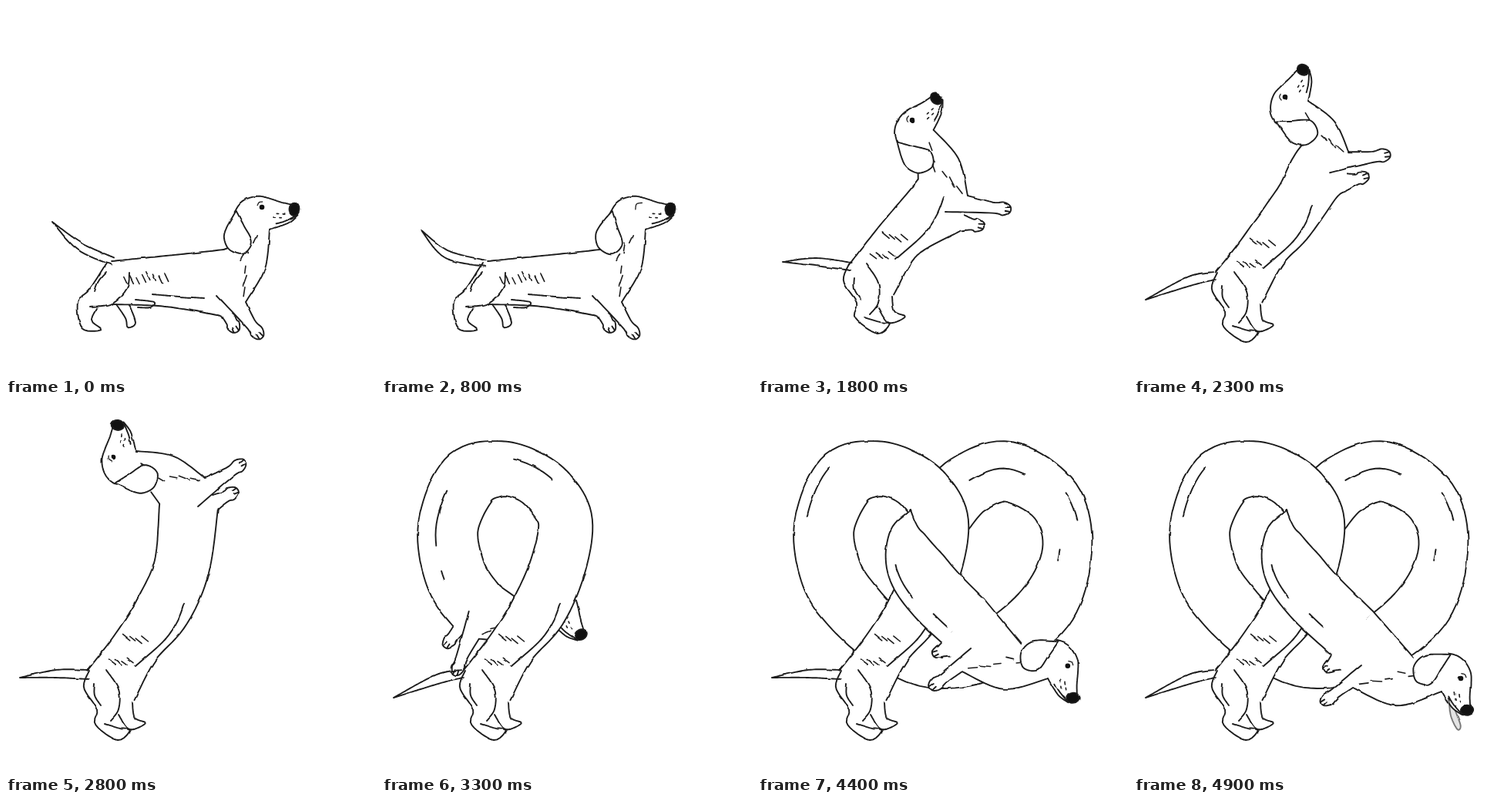
An HTML page that plays this animation: 480 px wide and 480 px high, repeating every 5 s.

```html
<!DOCTYPE html>
<html lang="en">
<head>
<meta charset="utf-8">
<title>Dachshund pretzel</title>
<style>
html, body { margin: 0; width: 100%; height: 100%; overflow: hidden; background: #fff; }
svg { display: block; width: 100vw; height: 100vh; }
</style>
</head>
<body>
<svg viewBox="0 0 480 480">
  <filter id="pencil" filterUnits="userSpaceOnUse" x="0" y="0" width="480" height="480" color-interpolation-filters="sRGB">
    <feTurbulence type="fractalNoise" baseFrequency=".07" numOctaves="1" seed="4"/>
    <feDisplacementMap in="SourceGraphic" scale="3" xChannelSelector="R" yChannelSelector="G"/>
  </filter>
  <g id="dog" filter="url(#pencil)" fill="none" stroke="#1c1c1c" stroke-width="1.9" stroke-linecap="round" stroke-linejoin="round"></g>
</svg>
<script>
const SUB = 10, COUNT = 40, RAD = Math.PI / 180;
const parse = s => s.split(' ').map(p => p.split(',').map(Number));
const rev = a => [...a].reverse();
const lerp = (a, b, k) => a + (b - a) * k;
const lerpPt = (p, q, k) => p.map((v, i) => lerp(v, q[i], k));
const spin = ([x, y], r) => [x * Math.cos(r) - y * Math.sin(r), x * Math.sin(r) + y * Math.cos(r)];
const add = (p, x, y) => [p[0] + x, p[1] + y, ...p.slice(2)];

function random(seed) {
  return () => (seed = (seed * 16807) % 2147483647) / 2147483647;
}

// Catmull-Rom curve; a third value (half width) is carried along
function smooth(pts) {
  const out = [], at = i => pts[Math.max(0, Math.min(pts.length - 1, i))];
  for (let i = 0; i < pts.length - 1; i++) {
    const [a, b, c, d] = [at(i - 1), at(i), at(i + 1), at(i + 2)];
    for (let j = 0; j < SUB; j++) {
      const t = j / SUB;
      out.push(b.map((_, k) => .5 * (2 * b[k] + (c[k] - a[k]) * t
        + (2 * a[k] - 5 * b[k] + 4 * c[k] - d[k]) * t * t
        + (3 * b[k] - a[k] - 3 * c[k] + d[k]) * t * t * t)));
    }
  }
  return [...out, at(pts.length)];
}

// evenly spaced points, so that any two curves can be blended
function even(pts) {
  const len = [0];
  for (let i = 1; i < pts.length; i++)
    len.push(len[i - 1] + Math.hypot(pts[i][0] - pts[i - 1][0], pts[i][1] - pts[i - 1][1]));
  const total = len[len.length - 1], out = [];
  for (let n = 0, i = 1; n < COUNT; n++) {
    const d = total * n / (COUNT - 1);
    while (i < pts.length - 1 && len[i] < d) i++;
    out.push(lerpPt(pts[i - 1], pts[i], (d - len[i - 1]) / (len[i] - len[i - 1] || 1)));
  }
  return out;
}
const curve = s => even(smooth(parse(s)));
const curves = raw => Object.fromEntries(Object.entries(raw).map(([k, s]) => [k, curve(s)]));

// a line beside a spine; side -1 is the back, 1 the belly
const beside = (spine, side) => spine.map(([x, y, half], i) => {
  const a = spine[Math.max(0, i - 1)], b = spine[Math.min(spine.length - 1, i + 1)];
  const dx = b[0] - a[0], dy = b[1] - a[1], k = half * side / (Math.hypot(dx, dy) || 1);
  return [x - dy * k, y + dx * k];
});
const edges = spine => [beside(spine, -1), beside(spine, 1)];

// spines: x, y, half width
const LEGUP = '136,365,36 168,315,31 203,268,36 228,211,36';
const RING = smooth(parse(LEGUP + ' 238,153,35 219,116,35 190,93,34 152,84,36 112,99,41 86,158,39 94,217,40 119,258,40 165,302,38 225,331,37 298,321,36 372,265,38 401,190,32 385,125,35 325,88,39 272,105,40 240,140,40'));
const STRAND = smooth(parse('198,138,0 192,168,22 203,208,37 232,248,40 283,297,39'));
const [RING_EDGES, STRAND_EDGES] = [RING, STRAND].map(edges);

const TAIL = curves({
  raised: '138,331,5 96,312,5 60,280,0',
  dropped: '134,334,4 84,322,5 51,291,0',
  back: '121,338,5 75,332,5 32,332,0',
  level: '107,351,6 65,350,5 18,355,0',
  low: '104,350,5 72,357,6 15,381,0'
});
const STANDING = curves({
  thigh: '130,334 108,368 93,384 99,418 124,420 111,408 118,392',
  haunch: '160,347 157,366 138,386 109,390',
  inner: '130,345 120,357 115,370',
  far: '143,387 155,405 158,417 168,411 160,388',
  fold: '190,374 225,377 258,379',
  bump: '168,381 191,384 187,391 172,391'
});
const UPRIGHT = curves({
  thigh: '108,346 101,368 118,396 116,416 145,436 161,423 148,421 128,415',
  haunch: '130,345 146,370 146,396 135,411',
  inner: '115,363 115,378 123,391',
  far: '146,403 160,422 181,414 167,407 164,388',
  fold: '168,340 205,307 222,282 231,259'
});
const warp = (o, fn) => Object.fromEntries(Object.entries(o).map(([k, v]) => [k, v.map(fn)]));

// points: eye, shoulder, chest, near paw, far paw
const front = (pts, look, swing, bulge) => ({ pts: parse(pts), look, swing, bulge });
const STAND = {
  spine: curve('138,359,28 208,357,33 281,359,43'), tail: TAIL.raised, hind: STANDING,
  front: front('332,261 274,376 311,384 331,430 299,422', 4, 0, .1)
};
const RISE = {
  spine: curve('147,355,35 184,302,31 236,258,43'), tail: TAIL.back, hind: warp(UPRIGHT, p => add(p, 10, -11)),
  front: front('200,148 243,267 272,246 327,264 292,286', -42, 0, .12)
};
const TALL = {
  spine: curve(LEGUP + ' 237,133,38'), tail: TAIL.level, hind: UPRIGHT,
  front: front('139,69 249,133 258,96 309,75 300,112', -82, -.15, .12)
};
const THREAD = front('313,275 201,233 188,264 147,287 149,243', 88, -.25, .1);
const END = front('424,356 295,338 284,368 244,389 247,345', 79, -.25, .18);

// head seen from the eye: x runs to the nose, y to the jaw
const HEAD = {
  crown: '-35,9 -29,-2 -19,-10 -5,-14 9,-12 25,-8 38,-6',
  muzzle: '47,7 37,17 25,23 12,28',
  mouth: '45,8 31,16 20,20',
  ear: '-33,7 -44,30 -46,44 -38,58 -20,62 -10,46 -22,25 -33,7',
  tongue: '22,20 45,22 64,17 60,12 40,15'
};
const EAR_ROOT = [-33, 7], NAPE = [-38, 55];

const mixCurve = (a, b, h, f = h) => a.map((p, i) => lerpPt(p, b[i], lerp(h, f, i / (COUNT - 1))));
const mixFront = (a, b, k) => ({
  pts: mixCurve(a.pts, b.pts, k),
  look: lerp(a.look, b.look, k), swing: lerp(a.swing, b.swing, k), bulge: lerp(a.bulge, b.bulge, k)
});
// h blends the hind end, f the front end
const mix = (a, b, h, f = h) => ({
  spine: mixCurve(a.spine, b.spine, h, f),
  tail: mixCurve(a.tail, b.tail, h),
  hind: Object.fromEntries(Object.keys(b.hind).map(k => [k, mixCurve(a.hind[k], b.hind[k], h)])),
  front: mixFront(a.front, b.front, f)
});

let ink = '';
const path = pts => 'M' + pts.map(p => p[0].toFixed(1) + ' ' + p[1].toFixed(1)).join('L');
const line = (pts, attr = '') => { ink += `<path d="${path(pts)}" ${attr}/>`; };
const cover = pts => line(pts, 'fill="#fff" stroke="none"');
const solid = pts => line(pts, 'fill="#fff"');

function dash(p, angle, length) {
  const [x, y] = spin([length / 2, 0], angle);
  line([add(p, -x, -y), add(p, x, y)], 'stroke-width="1.6"');
}

function drawLimb(inner, outer, paw) {
  const base = lerpPt(inner, outer, .5);
  const dx = paw[0] - base[0], dy = paw[1] - base[1], len = Math.hypot(dx, dy);
  const side = Math.sign((outer[1] - base[1]) * dx - (outer[0] - base[0]) * dy);
  const at = (back, w) => add(paw, ...spin([-back, w * side], Math.atan2(dy, dx)));
  const wrist = Math.min(22, len / 2);
  solid(smooth([inner, at(wrist, -7), at(9, -8.5), at(0, -4), at(0, 4), at(9, 8.5), at(wrist, 7), outer]));
  [-3, 3].forEach(w => line([at(0, w), at(6, w * .8)]));
}

function drawFront({ pts: [eye, shoulder, chest, paw, farPaw], look, swing, bulge }, back, belly, { closed, pant } = {}) {
  const turn = look * RAD;
  const place = p => add(eye, ...spin(p, turn));
  const part = (k, fn = p => p) => smooth(parse(HEAD[k]).map(p => place(fn(p))));
  const [crown, muzzle] = ['crown', 'muzzle'].map(k => part(k));
  const chin = muzzle[muzzle.length - 1], nape = place(NAPE);
  const dx = chin[0] - chest[0], dy = chin[1] - chest[1], run = Math.atan2(dy, dx);
  const throat = smooth([chest, add(lerpPt(chest, chin, .5), -dy * bulge, dx * bulge), chin]);

  drawLimb(belly, lerpPt(belly, chest, .45), farPaw);
  cover([...throat, ...rev(muzzle), ...rev(crown), nape, back, belly]);
  if (pant) line(part('tongue', ([x, y]) => [22 + (x - 22) * pant, y]), 'stroke="#777" fill="#e4e4e4"');
  [throat, muzzle, crown, part('mouth'), [back, nape]].forEach(s => line(s));
  drawLimb(shoulder, chest, paw);

  const rnd = random(31);
  for (let i = 0; i < 6; i++) {
    const inward = spin([0, -6 - 17 * rnd()], run);
    dash(add(lerpPt(chest, chin, .12 + .14 * i), ...inward), run + (rnd() - .5) * .4, 9 + 7 * rnd());
  }
  solid(part('ear', ([x, y]) => add(EAR_ROOT, ...spin([x - EAR_ROOT[0], y - EAR_ROOT[1]], swing))));

  const mark = s => line(smooth(parse(s).map(place)), 'stroke-width="1.3"');
  if (closed) mark('-3,3 -2,-4 5,-6');
  else {
    ink += `<circle cx="${eye[0]}" cy="${eye[1]}" r="3.3" fill="#111" stroke="none"/>`;
    mark('-6,-2 -4,-6 0,-7');
  }
  for (let i = 0; i < 4; i++) dash(place([17 + 4 * i, 12 - 5 * (i % 2)]), turn, 2.5);
  ink += `<ellipse rx="6.5" ry="8.3" fill="#111" transform="translate(${place([42, 0])}) rotate(${look})"/>`;
}

function drawHind({ spine, tail, hind }) {
  const [a, b] = edges(tail);
  line([...a, ...rev(b)]);
  Object.values(hind).forEach(s => line(s));

  const rnd = random(7);
  for (const distance of [60, 33]) {
    const i = spine.findIndex(p => Math.hypot(p[0] - spine[0][0], p[1] - spine[0][1]) >= distance);
    const heading = Math.atan2(spine[i + 1][1] - spine[i][1], spine[i + 1][0] - spine[i][0]);
    for (let n = 0; n < 4; n++)
      dash(add(spine[i].slice(0, 2), n * 8 - 16, rnd() * 7 - 7), heading / 2 + 65 * RAD, 8 + 4 * rnd());
  }
}

function drawDog(p, closed) {
  const [back, belly] = edges(p.spine);
  line(back);
  line(belly);
  drawFront(p.front, back[COUNT - 1], belly[COUNT - 1], { closed });
  drawHind(p);
}

// body between two key places
function tube(sides, a, b) {
  if (b <= a) return;
  const [i, o] = sides.map(e => e.slice(Math.round(a * SUB), Math.round(b * SUB) + 1));
  cover([...i, ...rev(o)]);
  line(i);
  line(o);
}

// shading line along a spine, as a share of the half width
function sheen(spine, a, b, share) {
  const part = spine.slice(Math.round(a * SUB), Math.round(b * SUB) + 1);
  line(beside(part.map(([x, y, h]) => [x, y, h * share]), 1));
}
const SHEEN = [
  [3100, 3600, 5.3, 6.6, .4], [3200, 3600, 8.4, 9.4, .4], [3300, 3600, 9.9, 10.1, .4],
  [3700, 4900, 8, 8.9, .62], [3900, 4900, 17.7, 18.9, .1], [3900, 4900, 16.5, 17, .5], [3900, 4900, 15.8, 16, -.3]
];

// the upright front half, carried rigidly to sample i of the ring
function carryFront(i) {
  const p = RING[i], before = RING[i - SUB], f = TALL.front;
  const turn = Math.atan2(p[1] - before[1], p[0] - before[0]) + Math.PI / 2;
  const pts = f.pts.map(([x, y]) => add(p.slice(0, 2), ...spin([x - 237, y - 133], turn)));
  drawFront({ ...f, pts, look: f.look + turn / RAD }, RING_EDGES[0][i], RING_EDGES[1][i]);
}

function drawRing(q) {
  const moving = q < 4000, odd = q / 100 % 2;
  const u = moving ? 5.1 + 1.49 * (q - 2900) / 100 : 20;
  const tip = Math.round(u * SUB), under = u > 12;
  tube(RING_EDGES, 12, u);
  if (moving && under) carryFront(tip);
  tube(RING_EDGES, 7, Math.min(u, 12));
  if (moving && !under) carryFront(tip);
  tube(RING_EDGES, 0, Math.min(u, 7));
  SHEEN.forEach(([from, to, ...s]) => { if (q >= from && q <= to) sheen(RING, ...s); });
  drawHind({ ...TALL, tail: odd ? TAIL.low : TAIL.level });
  if (moving) return;

  const k = Math.min(1, (q - 4000) / 500), v = 2 + 2 * k, end = Math.round(v * SUB);
  tube(STRAND_EDGES, 0, v);
  if (k > .5) {
    sheen(STRAND, 1.8, 2.7, .65);
    sheen(STRAND, 3.2, 3.5, .5);
  }
  const nod = q > 4500 && !odd;
  const f = mixFront(THREAD, END, k);
  if (nod) f.pts[0] = add(f.pts[0], 7, -4);
  drawFront(f, STRAND_EDGES[0][end], STRAND_EDGES[1][end], { pant: k === 1 && (nod ? .85 : 1) });
}

function drawIdle(n) {
  const down = [0, 1, .2][n];
  drawDog({
    ...STAND,
    tail: mixCurve(TAIL.raised, TAIL.dropped, down),
    front: { ...STAND.front, swing: .17 * Math.sqrt(down) }
  }, n === 1);
}

function drawStretch(q) {
  const s = (q - 1800) / 1000, lean = 42 * s * (1 - s ** 20);
  const sway = p => add(p, lean * Math.max(0, 300 - p[1]) / 200, 0);
  const p = mix(RISE, TALL, Math.min(1, s / .3), s ** 1.4);
  p.spine = p.spine.map(sway);
  p.front.pts = p.front.pts.map(sway);
  if (s > .3 && q / 100 % 2) p.tail = TAIL.low;
  drawDog(p);
}

function draw(q) {
  ink = '';
  if (q < 1600) drawIdle(q / 200 % 3);
  else if (q < 1800) drawDog(mix(STAND, RISE, (q - 1500) / 300));
  else if (q <= 2800) drawStretch(q);
  else drawRing(q);
  document.getElementById('dog').innerHTML = ink;
}

const start = performance.now();
let shown = -1;
function tick() {
  const t = (performance.now() - start) % 5000;
  const step = t < 1600 ? 200 : 100;
  const q = Math.floor(t / step) * step;
  if (q !== shown) draw(shown = q);
  requestAnimationFrame(tick);
}
tick();
</script>
</body>
</html>
```
